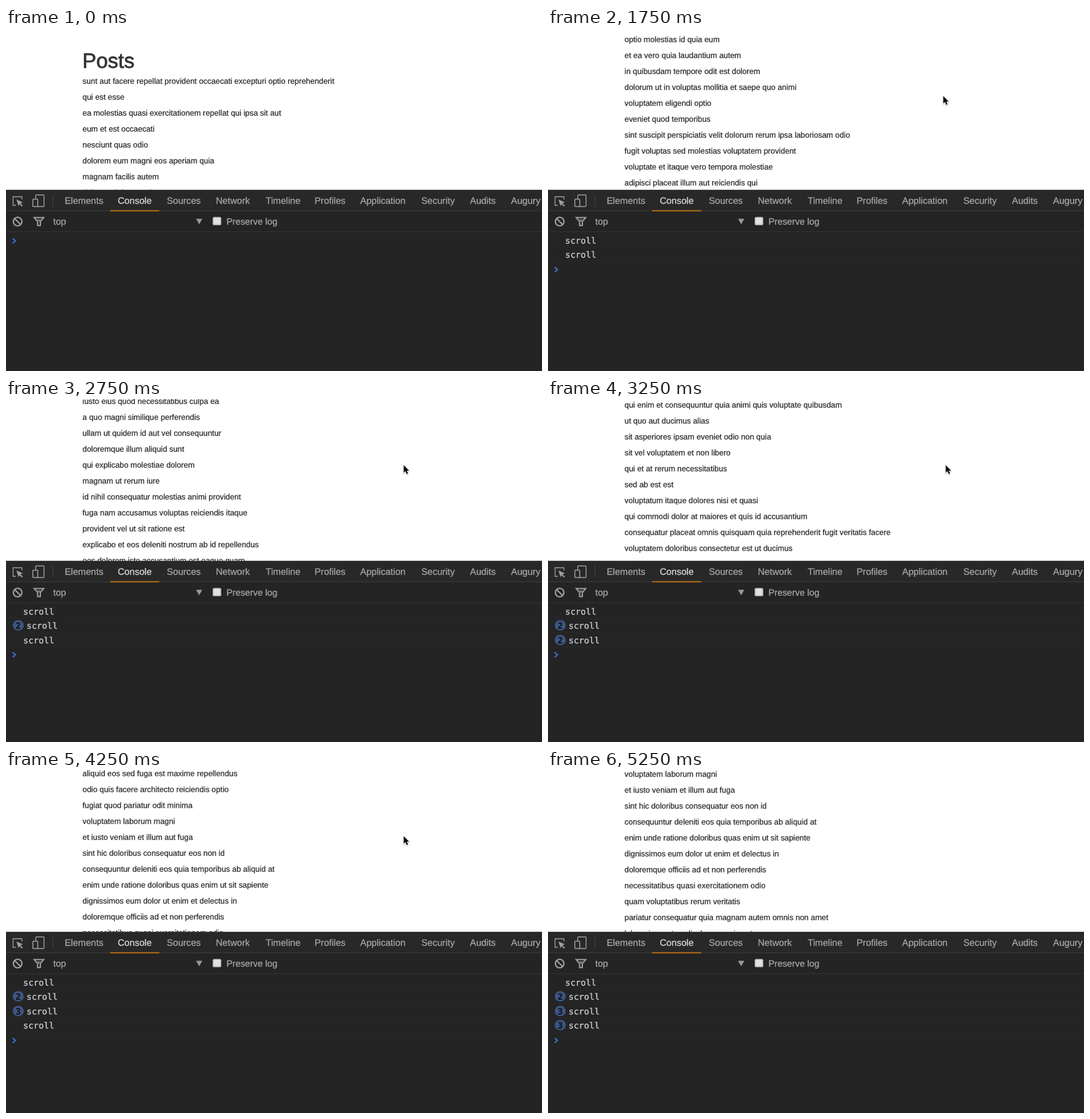
An HTML page with a canvas for the animation above (6 s loop, 874 px wide and 560 px high).

```html
<!DOCTYPE html>
<html lang="en">
<head>
<meta charset="utf-8">
<title>Posts</title>
<style>
html, body { margin: 0; width: 100%; height: 100%; overflow: hidden; background: #fff; }
canvas { display: block; }
</style>
</head>
<body>
<canvas id="stage" width="874" height="560"></canvas>
<script>
const ctx = document.getElementById('stage').getContext('2d');
const W = 874, H = 560, PANEL = 264;
const LOOP = 6000, STEP = 250;
const SANS = '"Liberation Sans", Arial, sans-serif';
const MONO = '"DejaVu Sans Mono", monospace';

const posts = `sunt aut facere repellat provident occaecati excepturi optio reprehenderit
qui est esse
ea molestias quasi exercitationem repellat qui ipsa sit aut
eum et est occaecati
nesciunt quas odio
dolorem eum magni eos aperiam quia
magnam facilis autem
dolorem dolore est ipsam
nesciunt iure omnis dolorem tempora et accusantium
optio molestias id quia eum
et ea vero quia laudantium autem
in quibusdam tempore odit est dolorem
dolorum ut in voluptas mollitia et saepe quo animi
voluptatem eligendi optio
eveniet quod temporibus
sint suscipit perspiciatis velit dolorum rerum ipsa laboriosam odio
fugit voluptas sed molestias voluptatem provident
voluptate et itaque vero tempora molestiae
adipisci placeat illum aut reiciendis qui
doloribus ad provident suscipit at
asperiores ea ipsam voluptatibus modi minima quia sint
dolor sint quo a velit explicabo quia nam
maxime id vitae nihil numquam
autem hic labore sunt dolores incidunt
rem alias distinctio quo quis
est et quae odit qui non
quasi id et eos tenetur aut quo autem
delectus ullam et corporis nulla voluptas sequi
iusto eius quod necessitatibus culpa ea
a quo magni similique perferendis
ullam ut quidem id aut vel consequuntur
doloremque illum aliquid sunt
qui explicabo molestiae dolorem
magnam ut rerum iure
id nihil consequatur molestias animi provident
fuga nam accusamus voluptas reiciendis itaque
provident vel ut sit ratione est
explicabo et eos deleniti nostrum ab id repellendus
eos dolorem iste accusantium est eaque quam
enim quo cumque
non est facere
commodi ullam sint et excepturi error explicabo praesentium voluptas
eligendi iste nostrum consequuntur adipisci praesentium sit beatae perferendis
optio dolor molestias sit
ut numquam possimus omnis eius suscipit laudantium iure
aut quo modi neque nostrum ducimus
quibusdam cumque rem aut deserunt
ut voluptatem illum ea doloribus itaque eos
laborum non sunt aut ut assumenda perspiciatis voluptas
repellendus qui recusandae incidunt voluptates tenetur qui omnis exercitationem
soluta aliquam a voluptas
qui enim et consequuntur quia animi quis voluptate quibusdam
ut quo aut ducimus alias
sit asperiores ipsam eveniet odio non quia
sit vel voluptatem et non libero
qui et at rerum necessitatibus
sed ab est est
voluptatum itaque dolores nisi et quasi
qui commodi dolor at maiores et quis id accusantium
consequatur placeat omnis quisquam quia reprehenderit fugit veritatis facere
voluptatem doloribus consectetur est ut ducimus
beatae enim quia vel
voluptas blanditiis repellendus animi ducimus error sapiente et suscipit
et fugit quas eum in in aperiam quod
consequatur id enim sunt et et
repudiandae ea animi iusto
aliquid eos sed fuga est maxime repellendus
odio quis facere architecto reiciendis optio
fugiat quod pariatur odit minima
voluptatem laborum magni
et iusto veniam et illum aut fuga
sint hic doloribus consequatur eos non id
consequuntur deleniti eos quia temporibus ab aliquid at
enim unde ratione doloribus quas enim ut sit sapiente
dignissimos eum dolor ut enim et delectus in
doloremque officiis ad et non perferendis
necessitatibus quasi exercitationem odio
quam voluptatibus rerum veritatis
pariatur consequatur quia magnam autem omnis non amet
labore in ex et explicabo corporis aut quas`.split('\n');

const tabs = [
  ['Elements', 95.8], ['Console', 182.2], ['Sources', 262.2], ['Network', 342.2],
  ['Timeline', 423.6], ['Profiles', 503.3], ['Application', 577.6], ['Security', 677.2],
  ['Audits', 756.6], ['Augury', 823.6]
];

// Scroll position per tick: three flicks of the page
const scroll = [0, 0, 0, 0, 138, 230, 286, 302, 335, 430, 595, 811,
  1120, 1403, 1484, 1545, 1662, 1797, 1856, 1870, 1874];

// Pointer: [from tick, x, y]
const pointer = [[1, 522, 83], [2, 640, 44], [3, 745, 33], [4, 774, 112],
  [6, 646, 110], [7, 644, 110], [9, 648, 107], [21, -50, -50]];

// Console row hit by each log call, one call every 500 ms from 1000 ms
const calls = [0, 1, 1, 2, 2, 2, 3, 3, 3];

// A thin outline gives the letters a slightly heavier weight
function text(str, x, y, font, color, outline = 0.25) {
  ctx.font = font;
  ctx.fillStyle = color;
  ctx.fillText(str, x, y);
  ctx.strokeStyle = color;
  ctx.lineWidth = outline;
  ctx.strokeText(str, x, y);
}

function rect(x, y, w, h, color) {
  ctx.fillStyle = color;
  ctx.fillRect(x, y, w, h);
}

function path(points, close) {
  ctx.beginPath();
  points.forEach(([x, y]) => ctx.lineTo(x, y));
  if (close) ctx.closePath();
}

function stroke(color, width) {
  ctx.strokeStyle = color;
  ctx.lineWidth = width;
  ctx.stroke();
}

function fill(color) {
  ctx.fillStyle = color;
  ctx.fill();
}

function box(x, y, w, h, r) {
  ctx.beginPath();
  ctx.roundRect(x, y, w, h, r);
}

function drawPage(top) {
  rect(0, 0, W, PANEL, '#fff');
  if (top < 80) text('Posts', 124.5, 64.5 - top, '34px ' + SANS, '#333', 0.8);
  posts.forEach((title, i) => {
    const y = 91 + 26 * i - top;
    if (y > -10 && y < PANEL + 12) text(title, 124.8, y, '12.8px ' + SANS, '#2a2a2a');
  });
}

function drawPointer(x, y) {
  path([[0, 0], [0, 14.5], [3.3, 11.4], [5.8, 17], [8.4, 15.9], [6, 10.5], [10.4, 10.5]]
    .map(([dx, dy]) => [x + 0.5 + dx * 0.85, y + 1 + dy * 0.85]), true);
  ctx.save();
  ctx.shadowColor = 'rgba(0,0,0,.3)';
  ctx.shadowBlur = 2;
  ctx.shadowOffsetY = 1;
  stroke('#fff', 1.6);
  ctx.restore();
  fill('#0c0c0c');
}

function drawIcons() {
  const c = '#a0a0a0';
  // inspect
  path([[16, 289.5], [11.5, 289.5], [11.5, 275.5], [26, 275.5], [26, 280]]);
  stroke(c, 1.3);
  path([[17, 280], [27.5, 284.5], [23.5, 286], [27.5, 290], [26, 291.5], [22, 287.5], [20.5, 291]], true);
  fill(c);
  // devices
  box(48.5, 272.5, 13.5, 19, 1);
  stroke(c, 1.4);
  box(43.7, 279.5, 8, 12, 1);
  fill('#282828');
  stroke(c, 1.5);
  rect(76, 272, 1, 20, '#424242');
  // clear
  ctx.beginPath();
  ctx.arc(19, 316, 7, 0, 7);
  stroke(c, 2.2);
  path([[14, 311], [24, 321]]);
  stroke(c, 2.2);
  // filter
  path([[46, 309.5], [61.5, 309.5], [56, 316], [56, 322.5], [51.5, 322.5], [51.5, 316]], true);
  stroke(c, 2);
  path([[49, 312.5], [58.5, 312.5], [56, 316], [51.5, 316]], true);
  fill('#777');
  // drop-down arrow
  path([[310, 311.5], [320, 311.5], [315, 320.5]], true);
  fill('#999');
  // check box
  box(337, 308.5, 14, 13.5, 2.5);
  fill('#bdbdbd');
  rect(339, 310, 10, 10, '#e2e2e2');
}

function drawPanel() {
  rect(0, PANEL, W, H - PANEL, '#242424');
  rect(0, PANEL, W, 34, '#282828');
  rect(0, PANEL, W, 1, '#4c4a47');
  rect(0, 298, W, 1, '#3c3c3c');
  rect(0, 332, W, 1, '#343434');
  tabs.forEach(([name, x]) =>
    text(name, x, 287, '15.1px ' + SANS, name === 'Console' ? '#dadada' : '#a8a8a8'));
  rect(170, 297.5, 80, 1.8, '#c4780f');
  drawIcons();
  text('top', 77, 321, '15px ' + SANS, '#a8a8a8');
  text('Preserve log', 359.4, 321, '14.8px ' + SANS, '#a8a8a8');
}

function drawConsole(t) {
  const counts = [];
  calls.forEach((row, i) => {
    if (t >= 1000 + 500 * i) counts[row] = (counts[row] || 0) + 1;
  });
  const rowY = i => 347 + Math.round(23.45 * i);
  counts.forEach((n, i) => {
    const y = rowY(i);
    rect(0, y + 11, W, 1, '#282828');
    if (n > 1) {
      box(11, y - 9, 18, 17, 8.5);
      fill('#3c5584');
      ctx.textAlign = 'center';
      text(n, 20, y + 5, 'bold 14px ' + MONO, '#151515');
      ctx.textAlign = 'left';
    }
    text('scroll', n > 1 ? 33.5 : 28, y + 5, '14px ' + MONO, '#cdd3d8');
  });
  const y = rowY(counts.length) + 0.5;
  path([[11, y - 4], [15.3, y], [11, y + 4]]);
  stroke('#3a76d8', 2);
}

function draw(now) {
  const t = now % LOOP;
  const tick = Math.floor(t / STEP);
  ctx.textRendering = 'geometricPrecision';
  drawPage(scroll[Math.min(tick, scroll.length - 1)]);
  const at = pointer.filter(p => p[0] <= tick).pop();
  if (at) drawPointer(at[1], at[2]);
  drawPanel();
  drawConsole(t);
}

const start = performance.now();
function loop() {
  draw(performance.now() - start);
  requestAnimationFrame(loop);
}
loop();
</script>
</body>
</html>
```
